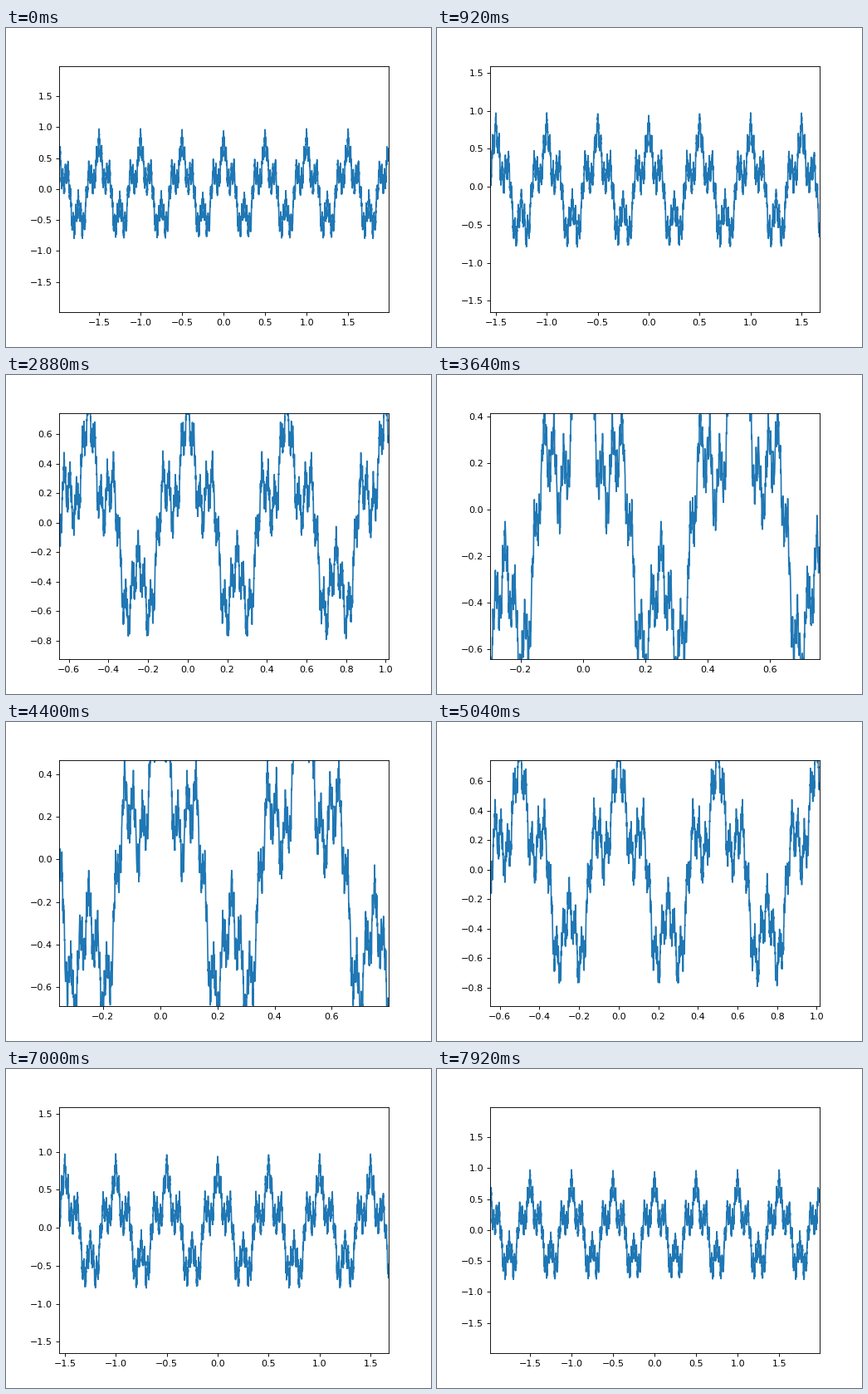
These frames come from a looping animation (512x384 px, 7960 ms). A matplotlib script:

```python
import numpy as np
import matplotlib.pyplot as plt
from matplotlib.animation import FuncAnimation

STEPS = 100                    # zoom steps from the wide view to the close one
FRAMES = 2 * STEPS - 1         # in and back out again
INTERVAL = 40

WIDE = np.array([-2.0, 2.0, -2.0, 2.0])
CLOSE = np.array([-0.15, 0.65, -0.525, 0.275])


def weierstrass(x, a=0.5, b=4, terms=20):
    return sum(a**n * np.cos(b**n * np.pi * x) for n in range(1, terms + 1))


fig, ax = plt.subplots(figsize=(6.4, 4.8), dpi=80)
x = np.linspace(-2, 2, 10000)
line, = ax.plot(x, weierstrass(x))


def update(i):
    step = STEPS - abs(STEPS - 1 - i)
    left, right, bottom, top = WIDE + (CLOSE - WIDE) * step / STEPS
    ax.set_xlim(left, right)
    ax.set_ylim(bottom, top)
    return line,


anim = FuncAnimation(fig, update, frames=FRAMES, interval=INTERVAL,
                     repeat=True, repeat_delay=0, blit=False)
plt.show()
```
